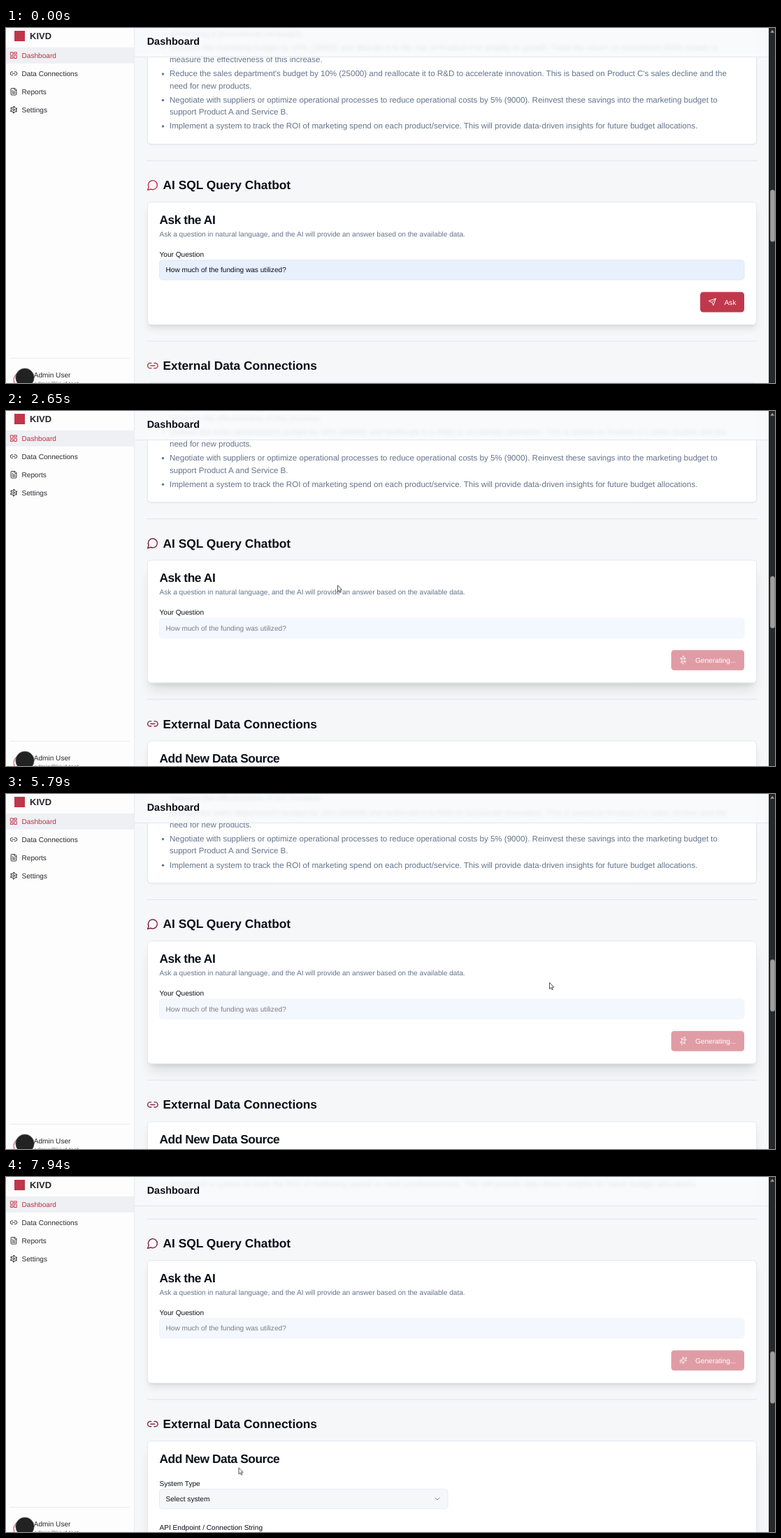
Write an HTML page that moves like this. It is 1100 px wide and 509 px high and loops after 8 s.

```html
<!DOCTYPE html>
<html lang="en">
<head>
<meta charset="utf-8">
<title>Dashboard</title>
<style>
  html, body { margin: 0; width: 100%; height: 100%; overflow: hidden; background: #f6f7f9; }
  #stage { position: relative; width: 1100px; height: 509px; overflow: hidden; background: #f6f7f9;
    font-family: "Liberation Sans", Arial, sans-serif; text-rendering: geometricPrecision; }
  #stage > *, #page > * { position: absolute; box-sizing: border-box; }
  svg { left: 0; top: 0; overflow: visible; }
  text { font-size: 10.11px; fill: #0b0f19; white-space: pre; }
  .icon { fill: none; stroke: currentColor; stroke-width: 2; stroke-linecap: round; stroke-linejoin: round; }

  #page { left: 0; top: 0; width: 1091px; height: 700px; animation: scroll 8s infinite; }
  .card { left: 201.7px; width: 872.6px; background: #fff; border: .8px solid #e2e6ed; border-radius: 5.8px; }
  .plain { top: -120px; height: 286.5px; box-shadow: 0 1px 2px rgba(0,0,0,.05); }
  .raised { box-shadow: 0 7px 11px -2px rgba(0,0,0,.1), 0 3px 4px -3px rgba(0,0,0,.1); }
  .ask { top: 248.5px; height: 177px; animation: askHover 8s infinite; }
  .source { top: 507.5px; height: 300px; animation: sourceHover 8s infinite; }
  .list text { font-size: 11.55px; fill: #64748b; }
  .list circle { fill: #64748b; }
  .h2 { font-size: 17.33px; font-weight: 700; }
  .tight { letter-spacing: -.025em; }
  .muted { fill: #64748b; }
  .mark { color: #c0364a; animation: markTint 8s step-end infinite; }
  .idle { animation: idle 8s step-end infinite; }
  .busy { animation: busy 8s step-end infinite; }
  .button { fill: #c0384b; animation: press 8s infinite; }
  .spin { transform-box: view-box; transform-origin: 12px 12px; animation: spin 8s linear infinite; }

  #header { left: 184px; top: 0; width: 907px; height: 42px; border-bottom: .8px solid #e3e6ec;
    background: rgba(248,249,251,.84); backdrop-filter: blur(2.9px); }
  #cursor { animation: pointer 8s ease-in-out infinite; }

  @keyframes scroll {
    0%, 28.75% { transform: translateY(0); animation-timing-function: ease-out; }
    33.9%, 71.5% { transform: translateY(-37px); animation-timing-function: linear; }
    77.6% { transform: translateY(-48.7px); animation-timing-function: ease-in-out; }
    86.2% { transform: translateY(-84.5px); animation-timing-function: linear; }
    88.75% { transform: translateY(-86.2px); animation-timing-function: ease-in-out; }
    96.6%, 100% { transform: translateY(-130px); }
  }
  @keyframes pointer {
    0% { transform: translate(957px, 496px); opacity: 0; animation-timing-function: step-end; }
    2% { transform: translate(957px, 496px); opacity: 1; }
    11.4%, 13.9% { transform: translate(1034px, 392px); }
    23.4%, 24.25% { transform: translate(572px, 243px); }
    33.1% { transform: translate(474px, 249.5px); }
    38.75% { transform: translate(284px, 285px); }
    44.75% { transform: translate(309px, 297px); }
    55.25% { transform: translate(800px, 330px); }
    62.75% { transform: translate(974px, 335px); }
    65.4%, 77.6% { transform: translate(777px, 270px); }
    88.75% { transform: translate(567px, 359px); }
    96.6% { transform: translate(336px, 416px); }
    99.25%, 100% { transform: translate(332.5px, 416.5px); opacity: 1; }
  }
  @keyframes askHover {
    0%, 28.75%, 85%, 100% { box-shadow: 0 7px 11px -2px rgba(0,0,0,.1), 0 3px 4px -3px rgba(0,0,0,.1); }
    31%, 82% { box-shadow: 0 14px 18px -4px rgba(0,0,0,.1), 0 6px 7px -4px rgba(0,0,0,.1); }
  }
  @keyframes sourceHover {
    0%, 91% { box-shadow: 0 7px 11px -2px rgba(0,0,0,.1), 0 3px 4px -3px rgba(0,0,0,.1); }
    94%, 100% { box-shadow: 0 14px 18px -4px rgba(0,0,0,.1), 0 6px 7px -4px rgba(0,0,0,.1); }
  }
  @keyframes markTint { 0% { color: #c0364a; } 28.75%, 100% { color: #80283f; } }
  @keyframes idle { 0% { visibility: visible; } 13.9%, 100% { visibility: hidden; } }
  @keyframes busy { 0% { visibility: hidden; } 13.9%, 100% { visibility: visible; } }
  @keyframes press { 0%, 9% { fill: #c0384b; } 10.5%, 100% { fill: #c64c5d; } }
  @keyframes spin { from { transform: rotate(-2775deg); } to { transform: rotate(21deg); } }
</style>
</head>
<body>
<div id="stage">
  <svg width="0" height="0">
    <symbol id="link" viewBox="0 0 24 24"><path d="M9 17H7A5 5 0 0 1 7 7h2M15 7h2a5 5 0 1 1 0 10h-2M8 12h8"/></symbol>
    <symbol id="chat" viewBox="0 0 24 24"><path d="M7.9 20A9 9 0 1 0 4 16.1L2 22Z"/></symbol>
    <symbol id="send" viewBox="0 0 24 24"><path d="m22 2-7 20-4-9-9-4ZM22 2 11 13"/></symbol>
    <symbol id="tiles" viewBox="0 0 24 24"><path d="M3 3h7v9H3ZM14 3h7v5h-7ZM14 12h7v9h-7ZM3 16h7v5H3Z"/></symbol>
    <symbol id="file" viewBox="0 0 24 24"><path d="M15 2H6a2 2 0 0 0-2 2v16a2 2 0 0 0 2 2h12a2 2 0 0 0 2-2V7ZM14 2v4a2 2 0 0 0 2 2h4M10 9H8M16 13H8M16 17H8"/></symbol>
    <symbol id="gear" viewBox="0 0 24 24">
      <circle cx="12" cy="12" r="3"/><circle cx="12" cy="12" r="7.6"/>
      <circle cx="12" cy="12" r="9.6" pathLength="60" stroke-width="2.6" stroke-linecap="butt" stroke-dasharray="4 6" stroke-dashoffset="-3"/>
    </symbol>
  </svg>

  <div id="page">
    <div class="card plain"></div>
    <div class="card raised ask"></div>
    <div class="card raised source"></div>
    <svg width="1091" height="700">
      <g class="list">
        <text x="234" y="12">advertising &amp; promotional campaigns.</text>
        <circle cx="224.5" cy="28.3" r="1.7"/>
        <text x="234" y="32">Increase the marketing budget by 10% (18000) and allocate it to the rise of Product A to amplify its growth. Track the return on investment (ROI) closely to</text>
        <text x="234" y="49.2">measure the effectiveness of this increase.</text>
        <circle cx="224.5" cy="66" r="1.7"/>
        <text x="234" y="69.4">Reduce the sales department's budget by 10% (25000) and reallocate it to R&amp;D to accelerate innovation. This is based on Product C's sales decline and the</text>
        <text x="234" y="86.7">need for new products.</text>
        <circle cx="224.5" cy="103.5" r="1.7"/>
        <text x="234" y="106.9">Negotiate with suppliers or optimize operational processes to reduce operational costs by 5% (9000). Reinvest these savings into the marketing budget to</text>
        <text x="234" y="124.2">support Product A and Service B.</text>
        <circle cx="224.5" cy="141" r="1.7"/>
        <text x="234" y="144.4">Implement a system to track the ROI of marketing spend on each product/service. This will provide data-driven insights for future budget allocations.</text>
      </g>

      <path d="M201.7 190.3h872.6M201.7 449h872.6" stroke="#e0e4ea"/>
      <g class="icon mark">
        <use href="#chat" x="201.2" y="216.5" width="17.33" height="17.33"/>
        <use href="#link" x="201.2" y="475.5" width="17.33" height="17.33"/>
      </g>
      <text class="h2" x="224.5" y="231.2">AI SQL Query Chatbot</text>
      <text class="h2" x="224.5" y="490.2">External Data Connections</text>

      <text class="h2 tight" x="219.5" y="280.6">Ask the AI</text>
      <text class="muted" x="219.5" y="298.6">Ask a question in natural language, and the AI will provide an answer based on the available data.</text>
      <text x="219.5" y="327.8">Your Question</text>

      <g class="idle">
        <rect x="219.5" y="332.8" width="836.5" height="28.2" rx="4.3" fill="#e8f0fe" stroke="#dde5f1" stroke-width=".8"/>
        <text x="228.5" y="350.4">How much of the funding was utilized?</text>
        <rect class="button" x="993" y="378.5" width="63" height="28.9" rx="4.3"/>
        <use class="icon" href="#send" x="1004.6" y="387.2" width="11.55" height="11.55" color="#fff"/>
        <text x="1027.4" y="396.6" style="fill:#fff">Ask</text>
      </g>
      <g class="busy">
        <rect x="219.5" y="332.8" width="836.5" height="28.2" rx="4.3" fill="#f3f7fe" stroke="#eef2f9" stroke-width=".8"/>
        <text x="228.5" y="350.4" style="fill:#7e8186">How much of the funding was utilized?</text>
        <rect x="951.5" y="378.5" width="104.5" height="28.9" rx="4.3" fill="#e09ca5"/>
        <svg x="963" y="387.2" width="11.55" height="11.55" viewBox="0 0 24 24" color="#fff">
          <path class="icon spin" d="M12 2 14 8.5Q14.4 9.6 15.5 10L22 12 15.5 14Q14.4 14.4 14 15.5L12 22 10 15.5Q9.6 14.4 8.5 14L2 12 8.5 10Q9.6 9.6 10 8.5ZM20 3v4M22 5h-4M4 17v2M5 18H3"/>
        </svg>
        <text x="986" y="396.6" style="fill:#fff">Generating...</text>
      </g>

      <text class="h2 tight" x="219.5" y="539.8">Add New Data Source</text>
      <text x="219.5" y="572.8">System Type</text>
      <rect x="219.5" y="577.5" width="412.5" height="28.2" rx="4.3" fill="#f6f7f9" stroke="#e2e6ed" stroke-width=".8"/>
      <text x="228.5" y="595">Select system</text>
      <path class="icon" d="m614 590 3 3 3-3" color="#7b7f87" style="stroke-width:1"/>
      <text x="219.5" y="636.2">API Endpoint / Connection String</text>
    </svg>
  </div>

  <div id="header"></div>

  <svg width="1100" height="509">
    <text x="201.7" y="23.6" style="font-size:14.44px;font-weight:700">Dashboard</text>

    <rect width="183.5" height="509" fill="#fdfdfe"/>
    <path d="M183.6 0v509" stroke="#e4e7ec" stroke-width=".8"/>
    <rect x="12" y="4" width="15" height="15" fill="#c0364a"/>
    <text x="34" y="16.2" style="font-size:13px;font-weight:700;fill:#27272a">KIVD</text>
    <rect y="27.8" width="183.2" height="23" fill="#eff0f3"/>
    <g class="icon" color="#2b2b30">
      <use href="#tiles" x="5.2" y="33.4" width="11.55" height="11.55" color="#c0364a"/>
      <use href="#link" x="5.2" y="59.4" width="11.55" height="11.55"/>
      <use href="#file" x="5.2" y="85.4" width="11.55" height="11.55"/>
      <use href="#gear" x="5.2" y="111.4" width="11.55" height="11.55"/>
    </g>
    <text x="22.5" y="42.8" style="fill:#b92f42">Dashboard</text>
    <text x="22.5" y="68.8" style="fill:#2b2b30">Data Connections</text>
    <text x="22.5" y="94.8" style="fill:#2b2b30">Reports</text>
    <text x="22.5" y="120.8" style="fill:#2b2b30">Settings</text>

    <path d="M5.8 473.5h171" stroke="#e4e7ec" stroke-width=".8"/>
    <circle cx="22" cy="504.5" r="11" fill="#fff" stroke="#c0364a"/>
    <text x="39.7" y="501.4" style="fill:#2b2b30">Admin User</text>
    <text x="39.7" y="513" style="font-size:8.67px;fill:#71757d">admin@kivd.test</text>
    <circle cx="27" cy="501.3" r="13.2" fill="#222" stroke="#5a5a5a" stroke-width=".8"/>

    <rect x="1091" width="9" height="509" fill="#262728"/>
    <path d="m1093.2 6.8 3-4 3 4Z" fill="#9b9b9b"/>
    <g style="animation: thumb 8s infinite">
      <rect x="1093.2" y="232" width="6.6" height="74.5" rx="3.3" fill="#9e9e9e"/>
    </g>
    <path id="cursor" d="M.5.4V9.4L2.6 7.5 4 10.7 5.4 10.1 4 7H6.8Z" fill="#fff" stroke="#33353a" stroke-width=".85" stroke-linejoin="round"/>
  </svg>
  <style>
    @keyframes thumb {
      0%, 28.75% { transform: translateY(0); animation-timing-function: ease-out; }
      33.9%, 71.5% { transform: translateY(5.1px); animation-timing-function: linear; }
      77.6% { transform: translateY(6.8px); animation-timing-function: ease-in-out; }
      86.2% { transform: translateY(11.8px); animation-timing-function: linear; }
      88.75% { transform: translateY(12px); animation-timing-function: ease-in-out; }
      96.6%, 100% { transform: translateY(18.2px); }
    }
  </style>
</div>
</body>
</html>
```
